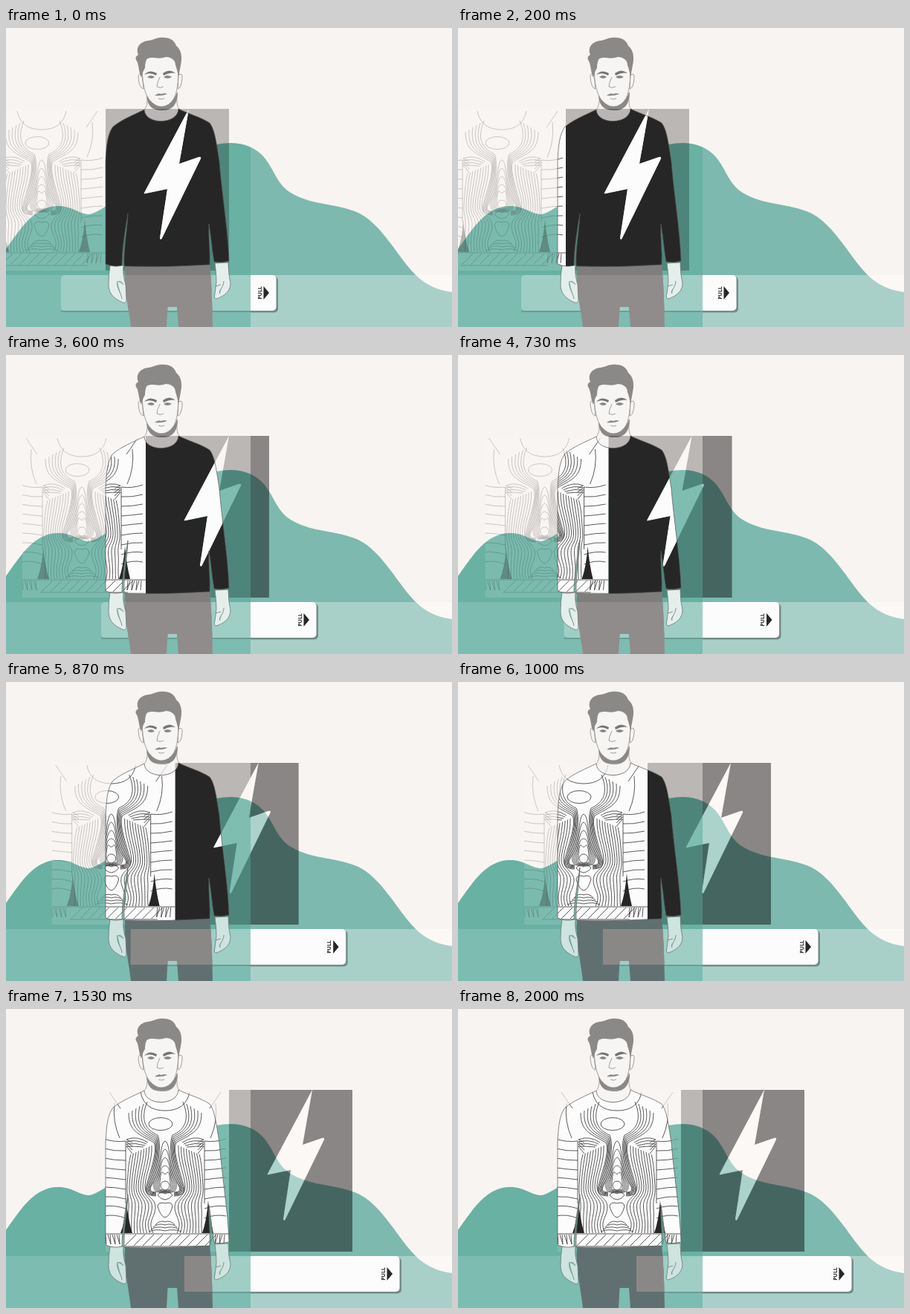
An HTML page with a canvas that plays this animation: 600 by 403 pixels, repeating every 2.07 s.

```html
<!DOCTYPE html>
<html lang="en">
<head>
<meta charset="utf-8">
<title>Pull-tab sweater</title>
<style>
html, body { margin: 0; width: 100%; height: 100%; overflow: hidden; background: #f8f4f1; }
canvas { display: block; }
</style>
</head>
<body>
<canvas id="stage" width="600" height="403"></canvas>
<script>
const c = document.getElementById('stage').getContext('2d');
const LOOP = 2070, STEP = 1000 / 15, EDGE = 329, TRAVEL = 166;
const INK = '#262626', GREY = '#8b8987';

// Slider travel: [time in ms, offset in px]
const KEYS = [[0, 0], [70, 1.5], [130, 5], [200, 11], [330, 24], [470, 40], [600, 54], [730, 68],
  [800, 80], [1000, 121], [1070, 134], [1200, 152], [1330, 161], [1500, 166], [LOOP, 166]];

function travel(t) {
  const i = KEYS.findIndex(k => k[0] > t);
  const [t0, x0] = KEYS[i - 1], [t1, x1] = KEYS[i];
  return x0 + (x1 - x0) * (t - t0) / (t1 - t0);
}

const path = d => new Path2D(d);
const white = a => `rgba(255,255,255,${a})`;
const black = a => `rgba(0,0,0,${a})`;

function fill(p, color, rule = 'nonzero') { c.fillStyle = color; c.fill(p, rule); }
function stroke(p, color, width = 1) { c.strokeStyle = color; c.lineWidth = width; c.stroke(p); }
function box(x, y, w, h, color) { c.fillStyle = color; c.fillRect(x, y, w, h); }
function clipped(p, draw) { c.save(); c.clip(p); draw(); c.restore(); }

const leftHalf = path(`M0 0H${EDGE}V403H0Z`), rightHalf = path(`M${EDGE} 0H600V403H${EDGE}Z`);

const hill = path(`M0 298C20 270 38 240 70 240C90 240 98 251 112 251C132 251 225 164 283 157
  C303 153 325 154 342 169C360 185 362 209 383 222C409 238 438 236 466 246
  C489 253 506 275 521 295C544 327 560 351 600 356V403H0Z`);

const shirt = path(`M186 110C172 117 156 123 144 133C137 142 135 157 134 180V318Q145 323 156 320
  C156 297 161 269 164 250C163 275 158 296 159 321Q216 323 274 319C275 300 272 283 273 264
  C276 281 277 299 280 315Q290 317 300 314C299 275 290 220 287 180C283 155 281 137 274 128
  C262 120 246 116 232 109C231 131 187 131 186 110Z`);

const legs = path('M160 320L274 318Q277 345 278 403H232L230 376H217.5L216 403H168C165 375 158 350 160 320Z');
const hands = [
  path(`M140 320H158C157 332 159 338 161 346L162 368Q160 372 157 370C148 366 138 360 138 346Q138 332 140 320Z
    M150 341C148 350 155 357 156 365M158 346Q154 340 151 342`),
  path(`M281 317L299 316Q299 331 302 344C302 356 292 362 283 365Q279 365 281 358L283 342Q283 330 281 317Z
    M293 341C293 350 285 354 288 358M282 348L289 346`)
];

const neck = path('M190 90Q191 107 185 111C187 131 231 131 233 109Q229 106 230 88Z');
const neckShade = path('M189 88C189 110 202 111 211 111C223 111 231 104 231 86C225 99 216 106 209 106C201 106 193 98 189 88Z');
const ears = path('M183 63Q178 60 178 66Q179 81 185 82ZM232 63Q238 60 237 68Q236 81 231 82Z');
const face = path('M183 44C183 70 185 86 193 97Q201 106 209 106Q219 106 226 95C232 82 232 66 232 43Q208 30 183 44Z');
const hair = path(`M182 67C178 58 179 48 175 43Q173 39 178 36C174 27 180 18 192 17C199 16 204 12 213 13
  C222 13 227 18 229 24C237 30 237 42 235 50L232 66Q230 55 228 50C228 43 222 39 215 39
  C205 43 197 38 190 41Q187 45 187 54Q184 58 182 67Z`);
const brows = path('M186 63Q193 55 203 61L202 64Q194 59 186 63ZM211 61Q220 54 228 61Q220 59 212 64Z');
const eyes = path('M190 66Q195 62 200 66Q196 70 190 66ZM212 66Q217 62 223 66Q217 70 212 66Z');
const mouth = path('M200 91Q205 87 209 89Q213 87 217 89Q209 92 200 91Z');
const features = path('M207 66Q203 74 203 79Q207 82 212 79M205 95Q209 97 213 95');

// The card is described at its final position: contour half at 134-300, dark half at 300-466.
const paper = path('M134 109H300V327H134Z');
const bolt = 'M412 109L352 222Q351 224 354 223L383 217L373 283Q374 287 376 283L428 176Q429 173 425 174L399 183Z';
const boltShape = path(bolt), darkPart = path('M300 109H466V327H300Z' + bolt);
const wedges = path('M162 258Q161 284 154 302H170Q164 284 162 258ZM272 258Q270 285 264 302H279Q274 282 272 258Z');

// Left half of the mask, measured from its axis.
const halfMask = (() => {
  let d = 'M0 246Q-8 247 -10 251Q-5 257 0 257M0 262Q-9 259 -10 266Q-6 280 0 281';
  // inner nose
  for (let i = 0; i < 5; i++) {
    const y = 178 + i * 11, w = 15 - i * 2;
    d += `M0 ${y}C${-7 + i} ${y + 2} -5 210 ${-w} 234C${-w - 2} ${250 - i} -7 ${246 - i} 0 ${249 - i}`;
  }
  // chest lines that turn in and run down the flank of the nose
  for (let i = 0; i < 6; i++) {
    d += `M${-24 - i * 5} ${125 + i * 3}C${-34 - i * 3} ${150 + i * 3} ${-26 - i * 2} ${163 + i} ${-10 - i} ${170 + i * 2}
      C${-5 - i} ${180 + i * 2} ${-8 - i * 2} 212 ${-17 - i * 1.5} 236Q${-25 - i} ${247 + i} -12 ${247 + i}`;
  }
  // cheeks and belly
  for (let i = 0; i < 9; i++) {
    d += `M${-18 - i * 3.5} ${184 + i * 1.5}C${-17 - i * 4} 206 ${-26 - i * 3} 222 ${-27 - i * 3} 238
      S${-12 - i * 4.5} 254 ${-13 - i * 4.5} 268S${-24 - i * 3} 286 ${-16 - i * 4.2} 302`;
  }
  // eyes, chin
  for (let i = 0; i < 4; i++) {
    d += `M${-23 - i * 2} ${180 + i * 2}Q${-38 - i} ${170 + i * 5} -52 ${176 + i * 3}l8 ${4 + i * 2}
      M0 ${287 + i * 4}Q${-7 - i * 2} ${284 + i * 4} ${-13 - i * 3} ${291 + i * 3}`;
  }
  // sleeve and cuff
  for (let i = 0; i < 9; i++) {
    const y = 175 + i * 13;
    d += `M-82 ${y}Q-68 ${y + 5 - i} -53 ${y + 3}`;
  }
  for (let i = 0; i < 7; i++) d += `M${-80 + i * 3} 304l${i % 2 ? 4 : 1} 13`;
  return path(d + 'M-68 127Q-71 152 -61 174M-53 178V262M-75 112L-60 134M-33 112Q-28 137 0 137');
})();
const details = (() => {
  let d = 'M134 303H300M158 320H276';
  for (let x = 160; x < 275; x += 12) d += `M${x} 319L${x + 15} 304`;
  return path(d);
})();

function contours(color, width) {
  for (const side of [1, -1]) {
    c.save();
    c.translate(214, 0);
    c.scale(side, 1);
    stroke(halfMask, color, width);
    c.restore();
  }
  const rings = new Path2D();
  rings.ellipse(208, 155, 16, 8.5, 0, 0, 7);
  rings.moveTo(220, 238);
  rings.arc(214, 238, 6, 0, 7);
  stroke(rings, color, width);
  stroke(details, color, width);
}

function card(dx, dark, light, sheet, line, width) {
  c.save();
  c.translate(dx - TRAVEL, 0);
  fill(paper, sheet);
  clipped(paper, () => {
    contours(line, width);
    fill(wedges, line);
  });
  fill(darkPart, dark, 'evenodd');
  fill(boltShape, light);
  c.restore();
}

function scenery() {
  box(0, 0, 600, 403, '#f8f4f1');
  clipped(leftHalf, () => fill(hill, '#68b1a3'));
  clipped(rightHalf, () => fill(hill, '#7db9ae'));
  box(0, 333, EDGE, 70, white(.14));
  box(EDGE, 333, 271, 70, white(.33));
}

function head() {
  fill(neck, '#f6f3f1');
  stroke(neck, GREY, .7);
  fill(neckShade, GREY);
  for (const p of [ears, face]) {
    fill(p, '#f7f5f3');
    stroke(p, GREY, .8);
  }
  fill(hair, GREY);
  fill(brows, '#777574');
  fill(eyes, GREY);
  fill(mouth, GREY);
  stroke(features, GREY, .8);
}

function tab(dx) {
  const x = 74 + dx, strip = new Path2D(), shade = new Path2D();
  strip.roundRect(x, 333, 289.5, 48, 5);
  shade.roundRect(x + 2, 335, 290, 48.5, 5);
  clipped(leftHalf, () => {
    box(x, 381, 290, 2, black(.16));
    fill(strip, white(.26));
  });
  clipped(rightHalf, () => {
    fill(shade, black(.32));
    fill(strip, '#fdfcfc');
  });
  fill(path(`M${x + 272.5} 348L${x + 280} 357L${x + 272.5} 366Z`), INK);
  c.save();
  c.translate(x + 268, 357);
  c.rotate(-Math.PI / 2);
  c.font = '700 7px "Open Sans", Inter, sans-serif';
  c.textAlign = 'center';
  c.textBaseline = 'middle';
  c.fillStyle = INK;
  c.fillText('PULL', 0, 0);
  c.restore();
}

function lowerBody(dx, late) {
  fill(legs, late ? '#607071' : '#8f8c8b');
  clipped(legs, () => {
    if (!late) box(150, 318, 130, 15, black(.1));
    box(74 + dx, 333, 292, 48, late ? '#8a8887' : '#8f8c8b');
  });
  for (const hand of hands) {
    fill(hand, late ? '#cde4df' : '#e4efec');
    stroke(hand, '#6f7775', .8);
  }
}

function draw(now) {
  const t = Math.floor((now % LOOP + 4) / STEP) * STEP;
  const dx = travel(Math.min(t, LOOP - 1)), late = t > 860;
  scenery();
  head();
  clipped(leftHalf, () => card(dx, black(.25), white(.15), white(.12), 'rgba(38,38,38,.32)', .7));
  clipped(rightHalf, () => card(dx, black(.45), white(.35), white(.12), 'rgba(38,38,38,.32)', .7));
  tab(dx);
  lowerBody(dx, late);
  clipped(shirt, () => card(dx, INK, '#fdfcfd', '#fdfcfd', INK, .75));
  stroke(shirt, '#555', .7);
  requestAnimationFrame(tick);
}

const start = performance.now();
function tick() { draw(performance.now() - start); }
tick();
</script>
</body>
</html>
```
